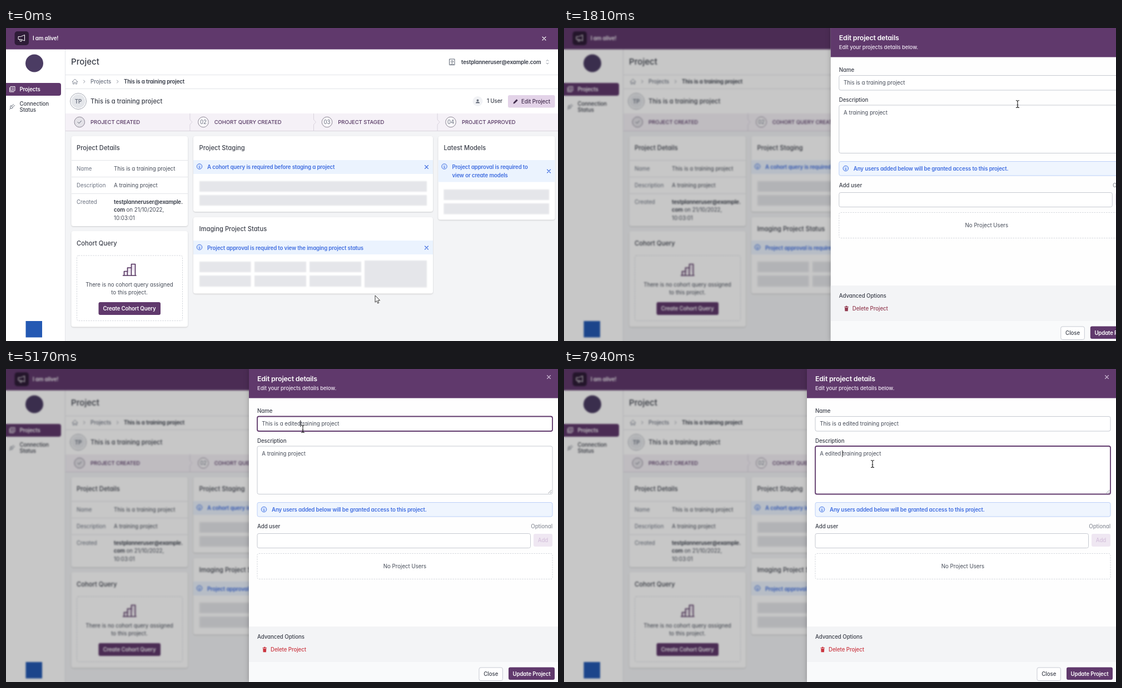
An HTML page for the animation above (8000 ms loop, 993 by 564 pixels).

```html
<!DOCTYPE html>
<html lang="en">
<head>
<meta charset="utf-8">
<title>Edit project</title>
<style>
  html, body { margin: 0; width: 100%; height: 100%; overflow: hidden; background: #f3f4f6; }
  svg, #shade { position: absolute; left: 0; top: 0; width: 993px; height: 564px; }
  svg { overflow: hidden; }
  #shade { background: rgba(0, 0, 0, .22); backdrop-filter: blur(1.7px); opacity: 0; }
  text { font: 400 9.7px Inter, "Open Sans", sans-serif; font-feature-settings: "cv11"; fill: #454b57; white-space: pre; }
  .h { font-size: 11.1px; font-weight: 500; letter-spacing: .06px; fill: #3b3f4a; }
  .m { font-weight: 500; letter-spacing: -.007em; fill: #3b3f4a; }
  .b { font-weight: 600; letter-spacing: -.015em; fill: #333844; }
  .grey { fill: #6b7280; }
  .blue { fill: #3f6de0; }
  .white { fill: #fff; }
  .step { font-size: 9.5px; fill: #553763; }
  .mid { text-anchor: middle; }
  .end { text-anchor: end; }
  .purple { fill: #60396c; }
  .line { fill: none; stroke: #e3e5e9; }
  .ico { fill: none; stroke: #5b6270; stroke-linecap: round; stroke-linejoin: round; }
  .card { fill: #fff; filter: drop-shadow(0 1px 1.2px rgba(0, 0, 0, .16)); }
  .tip { fill: #ebf3fe; }
  .bones { fill: #e5e6ea; filter: blur(1.2px); }
  .dash { fill: #fff; stroke: #d3d6dc; stroke-dasharray: 2.5 1.8; }
  .field { fill: #fff; stroke: #c6c9d1; }
  .ring { fill: none; stroke: #60396c; stroke-width: 1.8; opacity: 0; }
</style>
</head>
<body>
<svg id="page" viewBox="0 0 993 564">
  <defs>
    <g id="info" fill="#d6e4fd" stroke="#4a78e4">
      <circle r="4.8"/><path d="M-.8-.4H.1V2.3M-.9 2.4H1.1M0-2.4V-2.1" fill="none"/>
    </g>
    <path id="x" d="M-3-3L3 3M3-3L-3 3" fill="none" stroke-linecap="round" stroke-width="1.1"/>
  </defs>
  <rect width="993" height="564" fill="#f3f4f6"/>
  <path d="M0 38H106.500V564H0ZM107 38H993V154H107Z" fill="#fff"/>
  <path d="M106.500 38V564M107 84.500H993M107 109.500H993" class="line"/>
  <rect width="993" height="38.500" class="purple"/>

  <rect x="15.500" y="6" width="25.500" height="25" rx="5" fill="#2e1c37"/>
  <path d="M22.500 15.500H26.500L33.500 12.500V23L26.500 20.500H22.500ZM24.500 20.500L25.500 24H28V21" class="ico" style="stroke:#fff"/>
  <text x="48" y="22" class="b white">I am alive!</text>
  <use href="#x" x="968" y="19" stroke="#fff"/>

  <circle cx="51" cy="63.500" r="16" fill="#4b3c63"/>
  <path d="M0 99H95Q99 99 99 103V118Q99 122 95 122H0Z" class="purple"/>
  <path d="M8.500 105.500H16V113H8.500ZM6.500 107.500V115H14M10.500 108H14M10.500 110.500H14" class="ico" style="stroke:#fff"/>
  <text x="24.500" y="113.700" class="b white">Projects</text>
  <path d="M9 140L12.500 143.500Q10.500 146 8 144.500Q6.500 142 9 140ZM11 140L13.500 137.500M13 142L15.500 139.500M8 145L6.500 146.500" class="ico"/>
  <text x="24.500" y="139.500" class="m">Connection</text>
  <text x="24.500" y="151.300" class="m">Status</text>
  <rect x="35.500" y="528" width="29.500" height="29.500" fill="#2459b3"/>

  <text x="117" y="66.300" class="h" style="font-size:15px">Project</text>
  <path d="M798 56H807V66.500H798ZM800 66Q802.500 62.500 805 66" class="ico"/>
  <circle cx="802.500" cy="60.500" r="1.800" class="ico"/>
  <text x="819" y="64.500" class="b">testplanneruser@example.com</text>
  <path d="M972 59.500L974 57.500L976 59.500M972 63L974 65L976 63" class="ico" style="stroke:#8b919d"/>

  <path d="M119 97L124 92L129 97M120.500 96V101H122.800V98H125.200V101H127.500V96M139.500 94L142 96.500L139.500 99M199.500 94L202 96.500L199.500 99" class="ico" style="stroke:#8b919d"/>
  <text x="152" y="100" class="m grey">Projects</text>
  <text x="212" y="100" class="b">This is a training project</text>

  <circle cx="130" cy="132" r="14.500" fill="#fff" stroke="#a3a7b1"/>
  <circle cx="130" cy="132" r="12.500" fill="#e4e6ea"/>
  <text x="130" y="135.500" class="b grey mid">TP</text>
  <text x="152" y="136" class="h">This is a training project</text>
  <circle cx="848.500" cy="132" r="9" fill="#f1f2f5"/>
  <path d="M845 135.500Q845 132.800 848.500 132.800Q852 132.800 852 135.500Z" fill="#6b7280"/>
  <circle cx="848.500" cy="130.300" r="1.900" fill="#6b7280"/>
  <text x="865" y="135.300" class="m">1 User</text>
  <rect x="903" y="121" width="84.500" height="22.500" rx="3" fill="#e3d3e8"/>
  <path d="M912.500 136.500L913 134L918.500 128.300L920.700 130.500L915 136Z" fill="#44304f"/>
  <text x="927" y="135.500" class="m" style="fill:#44304f">Edit Project</text>

  <rect x="107" y="154" width="886" height="31" fill="#f5f1f7"/>
  <path d="M107 185.500H993" class="line" style="stroke:#d9d3dd"/>
  <g id="steps"></g>
  <path d="M129 169.500L131.300 171.800L135.500 167.300" class="ico"/>

  <rect x="117.500" y="195" width="209.500" height="162" rx="4" class="card"/>
  <text x="127" y="220" class="h">Project Details</text>
  <path d="M118 238.500H327M118 268.500H327M118 298.500H327" class="line"/>
  <text x="127" y="256.500" class="grey">Name</text>
  <text x="194" y="256.500">This is a training project</text>
  <text x="127" y="286.700" class="grey">Description</text>
  <text x="194" y="286.700">A training project</text>
  <text x="127" y="316.700" class="grey">Created</text>
  <text x="194" y="316.700" class="b">testplanneruser@example.</text>
  <text x="194" y="331.300"><tspan class="b">com</tspan> on 21/10/2022,</text>
  <text x="194" y="345.700">10:03:01</text>

  <rect x="117.500" y="366" width="209.500" height="172.500" rx="4" class="card"/>
  <text x="127" y="391.700" class="h">Cohort Query</text>
  <rect x="127.500" y="410" width="190" height="117.500" rx="3" class="dash"/>
  <path d="M210.500 446H234M212.500 446V438.500H218.500V446M218.500 438.500V432H225.500V446M225.500 432V425.500H232.500V446" class="ico" style="stroke:#51315d;stroke-width:1.600;fill:#eee6f1"/>
  <text x="222" y="466.300" class="mid">There is no cohort query assigned</text>
  <text x="222" y="480.300" class="mid">to this project.</text>
  <rect x="166.500" y="494" width="111.500" height="23" rx="3" class="purple"/>
  <text x="222" y="509.300" class="b white mid">Create Cohort Query</text>

  <rect x="337" y="195" width="431" height="136" rx="4" class="card"/>
  <text x="347.500" y="220" class="h">Project Staging</text>
  <rect x="337" y="238" width="431" height="25" class="tip"/>
  <use href="#info" x="348" y="249.500"/>
  <text x="362" y="254" class="b blue">A cohort query is required before staging a project</text>
  <use href="#x" x="756.500" y="250.500" stroke="#3f6de0"/>

  <rect x="337" y="341" width="431" height="137.500" rx="4" class="card"/>
  <text x="347.500" y="366" class="h">Imaging Project Status</text>
  <rect x="337" y="383" width="431" height="25" class="tip"/>
  <use href="#info" x="348" y="395"/>
  <text x="362" y="399.500" class="b blue">Project approval is required to view the imaging project status</text>
  <use href="#x" x="756.500" y="396" stroke="#3f6de0"/>

  <rect x="777.500" y="195" width="210" height="150.500" rx="4" class="card"/>
  <text x="787.500" y="220" class="h">Latest Models</text>
  <rect x="777.500" y="238" width="210" height="39.500" class="tip"/>
  <use href="#info" x="788.500" y="249.500"/>
  <text x="802.500" y="254" class="b blue">Project approval is required to</text>
  <text x="802.500" y="268.700" class="b blue">view or create models</text>
  <use href="#x" x="976.500" y="258" stroke="#3f6de0"/>

  <path class="bones" d="M348 276H757V295H348ZM348 301H757V320H348ZM787.500 291H977V310H787.500ZM787.500 316H977V335.500H787.500Z
    M348 421H440.500V440H348ZM447 421H540V440H447ZM546 421H639V440H546ZM348 446H440.500V466H348ZM447 446H540V466H447ZM546 446H639V466H546ZM645 419H757V467.500H645Z"/>
</svg>

<div id="shade"></div>

<svg id="front" viewBox="0 0 993 564">
  <g id="panel">
    <rect width="560" height="564" fill="#fefefe" style="filter:drop-shadow(0 0 4px rgba(0,0,0,.25))"/>
    <rect width="560" height="52.500" class="purple"/>
    <text x="15" y="22" class="b white" style="font-size:12.400px">Edit project details</text>
    <text x="15" y="38.300" class="m" style="font-size:9.500px;fill:#efe6f3">Edit your projects details below.</text>
    <use href="#x" x="539.500" y="14.500" stroke="#cdb9d5"/>

    <text x="15" y="79.300" class="m">Name</text>
    <rect x="15" y="85.500" width="531" height="26.500" rx="3" class="field"/>
    <rect x="15" y="85.500" width="531" height="26.500" rx="3" class="ring" id="nameRing"/>
    <text x="23.300" y="102" id="name"></text>

    <text x="15" y="132.500" class="m">Description</text>
    <rect x="15" y="139" width="531" height="86.500" rx="3" class="field"/>
    <rect x="15" y="139" width="531" height="86.500" rx="3" class="ring" id="descRing"/>
    <path d="M538.500 224L544.500 218M542 224L544.500 221.500" stroke="#777c86" stroke-width=".8"/>
    <text x="23.300" y="156.300" id="desc"></text>
    <rect id="caret" width="1" height="12" fill="#1d1d22"/>

    <rect x="15" y="240.500" width="531" height="25.500" rx="3" fill="#eff5fe" stroke="#bcd0f8"/>
    <use href="#info" x="27" y="253"/>
    <text x="41" y="257" class="b blue">Any users added below will be granted access to this project.</text>

    <text x="15" y="286.500" class="m">Add user</text>
    <text x="546" y="286.500" class="m end" style="fill:#8d919b">Optional</text>
    <rect x="15" y="296.500" width="491.500" height="26" rx="3" class="field"/>
    <rect x="512" y="297" width="34" height="23" rx="3" fill="#efe7f2"/>
    <text x="529" y="312" class="m mid" style="fill:#d5c2dc">Add</text>
    <rect x="15" y="332.500" width="531" height="46" rx="3" class="dash"/>
    <text x="280.500" y="359" class="mid">No Project Users</text>

    <rect y="464" width="560" height="64" fill="#f3f4f6"/>
    <text x="15" y="485.500" class="m">Advanced Options</text>
    <g id="del">
      <path d="M24.500 502H32V503.300H24.500ZM26.800 500.700H29.700V502H26.800ZM25.200 504H31.300L30.900 510.300H25.600Z"/>
      <text x="39" y="508.700" class="m" style="fill:inherit">Delete Project</text>
    </g>
    <rect y="528" width="560" height="36" fill="#f9fafb"/>
    <rect x="414" y="538" width="42.500" height="23.500" rx="3" class="field"/>
    <text x="435.300" y="553.300" class="m mid">Close</text>
    <rect x="467" y="537.500" width="83" height="22.500" rx="3" class="purple"/>
    <text x="508.500" y="552.500" class="b white mid">Update Project</text>
  </g>
  <path id="arrow" d="M0 0V12.300L2.800 9.700L4.700 14.200L6.700 13.300L4.800 9H8.700Z" fill="#fff" stroke="#222" stroke-width=".9" stroke-linejoin="round"/>
  <path id="beam" d="M-3-6.500Q0-6.500 0-4.500Q0-6.500 3-6.500M0-4.500V4.500M-3 6.500Q0 6.500 0 4.500Q0 6.500 3 6.500M-1.300 1.800H1.300" fill="none" stroke="#222" stroke-width="1.100"/>
</svg>

<script>
const $ = id => document.getElementById(id);
const LOOP = 8000, TICK = 69.64, BLINK = 530;

$('steps').innerHTML = ['PROJECT CREATED', 'COHORT QUERY CREATED', 'PROJECT STAGED', 'PROJECT APPROVED']
  .map((label, i) => {
    const x = 132.3 + i * 222.6;
    return `<circle cx="${x}" cy="169.500" r="9.300" fill="${i ? '#faf8fb' : '#e4e2e8'}" stroke="#8d8795"/>
      ${i ? `<text x="${x}" y="173" class="mid grey">0${i + 1}</text>
      <path d="M${x - 24} 154V165L${x - 20} 169.500L${x - 24} 174V185" class="line" style="stroke:#d9d3dd"/>` : ''}
      <text x="${x + 19.8}" y="172.800" class="m step">${label}</text>`;
  }).join('');

// Tracks hold [time, value, ...] rows
const slide = [[1390, 993], [1462, 942], [1532, 777], [1602, 645], [1671, 563], [1741, 510],
  [1811, 480], [1880, 459], [1950, 444], [2020, 437]];
const dim = [[1250, 0], [1462, .38], [1532, .72], [1602, .88], [1811, 1]];
const mouse = [[0, 664, 482], [140, 672, 472], [400, 800, 318], [650, 932, 168], [850, 969, 131], [1250, 969, 131],
  [1390, 952, 133], [1462, 924, 136], [1532, 889, 143], [1811, 816, 137], [2300, 775, 118], [2700, 750, 101],
  [2900, 749, 100], [3250, 620, 99], [3600, 494, 98], [3690, 494, 98], [3900, 534, 108], [5440, 534, 108],
  [5770, 437, 124], [6060, 466, 151], [6198, 472, 154], [6270, 474, 155], [6400, 555, 171]];
const nameFocus = [[2640, 0], [2760, 1], [6100, 1], [6400, 0]];
const descFocus = [[6120, 0], [6400, 1]];

const WORD = 'edited ';
const nameKeys = [4580, 4700, 4790, 4890, 4990, 5090, 5170];
const descKeys = [6540, 6670, 6930, 7060, 7280, 7480, 7800];
const CLICK_END = 2710, CLICK_NAME = 3690, CLICK_DESC = 6120;

function at(track, t) {
  const i = track.findIndex(p => p[0] > t);
  if (i === 0) return track[0].slice(1);
  if (i < 0) return track[track.length - 1].slice(1);
  const a = track[i - 1], b = track[i], k = (t - a[0]) / (b[0] - a[0]);
  return a.slice(1).map((v, j) => v + (b[j + 1] - v) * k);
}

function type(id, head, keys, t) {
  const n = keys.filter(k => k <= t).length;
  const text = head + WORD.slice(0, n) + 'training project';
  if ($(id).textContent !== text) $(id).textContent = text;
  return head.length + n;
}

function placeCaret(t, nameAt, descAt) {
  const inDesc = t >= CLICK_DESC, el = $(inDesc ? 'desc' : 'name');
  const marks = [CLICK_END, CLICK_NAME, CLICK_DESC, ...nameKeys, ...descKeys].filter(m => m <= t);
  const on = marks.length && (t - Math.max(...marks)) % (2 * BLINK) < BLINK;
  $('caret').style.display = on ? '' : 'none';
  if (!on) return;
  const x = t < CLICK_NAME
    ? el.getEndPositionOfChar(el.getNumberOfChars() - 1).x
    : el.getStartPositionOfChar(inDesc ? descAt : nameAt).x;
  $('caret').setAttribute('x', x - .7);
  $('caret').setAttribute('y', inDesc ? 146.5 : 92.3);
}

function draw(now) {
  const t = Math.floor((now % LOOP + 12) / TICK) * TICK + 1;

  $('panel').setAttribute('transform', `translate(${at(slide, t)[0]})`);
  $('panel').style.display = t < 1400 ? 'none' : '';
  $('shade').style.opacity = at(dim, t)[0];
  $('nameRing').style.opacity = at(nameFocus, t)[0];
  $('descRing').style.opacity = at(descFocus, t)[0];
  $('del').setAttribute('fill', t < 2085 ? '#923b50' : '#cb3640');

  placeCaret(t, type('name', 'This is a ', nameKeys, t), type('desc', 'A ', descKeys, t));

  const [x, y] = at(mouse, t), beam = t > 1700 && x > 452;
  $('beam').style.display = beam ? '' : 'none';
  $('arrow').style.display = beam ? 'none' : '';
  $(beam ? 'beam' : 'arrow').setAttribute('transform', `translate(${x} ${y})`);
  requestAnimationFrame(draw);
}
draw(0);
</script>
</body>
</html>
```
